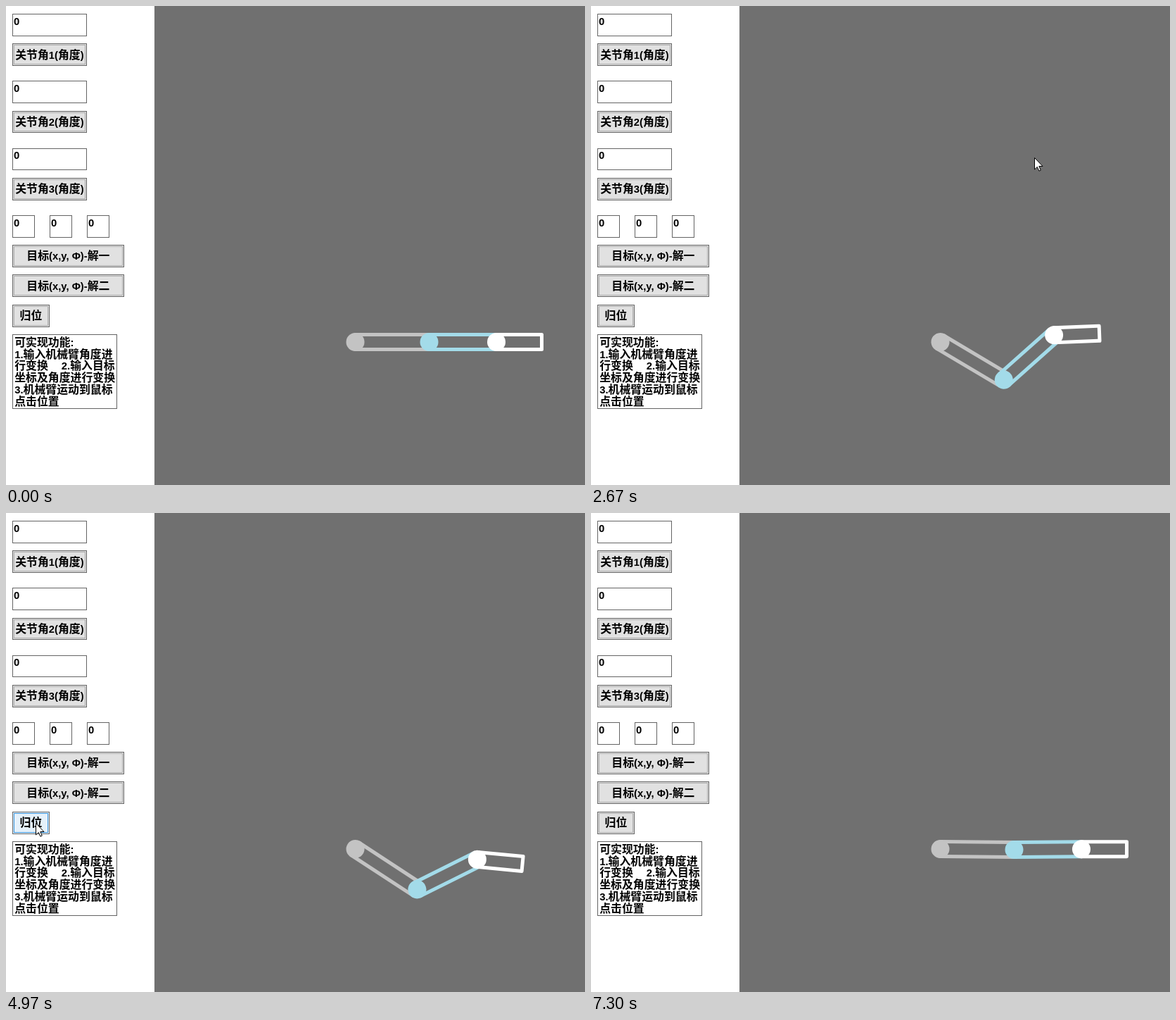
Animation of 823 by 680 pixels, one loop 7.53 s. Source, as an HTML page with a canvas:

```html
<!DOCTYPE html>
<html lang="zh">
<head>
<meta charset="utf-8">
<style>
html, body { margin: 0; width: 100%; height: 100%; overflow: hidden; background: #707070; }
canvas, svg { position: absolute; left: 0; top: 0; }
text { font: 13px "Noto Sans CJK SC", "Noto Sans CJK", sans-serif; fill: #111; }
#dialog { transform-origin: 638.5px 360.5px; }
#frame { filter: drop-shadow(0 2px 5px rgba(0, 0, 0, .4)); }
</style>
</head>
<body>
<canvas id="stage" width="823" height="680"></canvas>
<svg width="823" height="680">
  <g id="dialog">
    <rect id="frame" x="565.5" y="281.5" width="146" height="158" fill="#fbfbfb" stroke="#606060"/>
    <rect x="566" y="385" width="145" height="54" fill="#ebebeb"/>
    <rect id="ok" x="601" y="400" width="90" height="25" stroke="#0078d7" stroke-width="2"/>
    <text x="569" y="299">提示</text>
    <text x="578" y="352">无解!</text>
    <text x="646" y="417" text-anchor="middle" style="font-size:12px">确定</text>
    <path id="cross" d="M688 290l10 10m0-10l-10 10" stroke="#222"/>
  </g>
  <path id="pointer" d="M.5 .5V17L4.3 13.4L6.9 19.2L9.3 18.1L6.8 12.5H12Z" fill="#fff" stroke="#000"/>
</svg>
<script>
const $ = id => document.getElementById(id);
const ctx = $('stage').getContext('2d');
const LOOP = 7530;
const UNIT = 1.0583; // panel layout units to pixels

const links = [[105, '#c3c3c3'], [95.5, '#a3dbe9'], [64.5, '#ffffff']];

// Start time and goal angles (degrees) of each move
const moves = [
  [85, [20.5, -107, -35]],
  [1815, [33.2, -26.3, 5.5]],
  [5150, [0, 0, 0]]
];

// Pointer key points: time, x, y
const path = [
  [70, 650, 546], [250, 618, 384], [1130, 618, 384], [1740, 732, 498],
  [1900, 732, 498], [2670, 630, 215], [3200, 605, 155], [3700, 645, 414],
  [4370, 645, 414], [4970, 42, 440], [5450, 42, 440], [5750, 172, 461], [6550, 795, 681]
];

const mix = (a, b, k) => a + (b - a) * k;
const clamp = v => Math.max(0, Math.min(1, v));
const isHan = s => /[\u4e00-\u9fff]/.test(s);

// Rectangle in layout units, snapped to whole pixels
function box(x, y, w, h, fill, line, inset = 0) {
  const px = v => Math.ceil(v * UNIT - 1.6), py = v => Math.ceil(v * UNIT);
  const left = px(x) + inset, top = py(y) + inset;
  const width = px(x + w) - inset - left, height = py(y + h) - inset - top;
  ctx.fillStyle = fill;
  ctx.fillRect(left, top, width, height);
  ctx.strokeStyle = line;
  ctx.lineWidth = 1;
  ctx.strokeRect(left + .5, top + .5, width - 1, height - 1);
}

// Bold text in layout units, mixing Chinese and Latin runs
function label(str, x, y, centered) {
  const runs = str.match(/[\u4e00-\u9fff]+|[^\u4e00-\u9fff]+/g);
  const width = s => {
    ctx.font = isHan(s) ? 'bold 15px "Noto Sans CJK SC", "Noto Sans CJK", sans-serif'
      : 'bold 14px "Liberation Sans", sans-serif';
    return ctx.measureText(s).width;
  };
  if (centered) x -= runs.reduce((sum, s) => sum + width(s), 0) / 2;
  ctx.save();
  ctx.translate(-1.6, 0);
  ctx.scale(UNIT, UNIT);
  ctx.fillStyle = '#000';
  for (const s of runs) {
    const w = width(s);
    ctx.fillText(s, x, y);
    x += w;
  }
  ctx.restore();
}

function input(x, y, w) {
  box(x, y, w, 30, '#fff', '#646464');
  label('0', x + 2, y + 15.5);
}

function button(str, y, w, hot) {
  const face = hot ? '#e5f1fb' : '#e1e1e1';
  box(10, y, w, 30, face, '#646464');
  box(10, y, w, 30, face, hot ? '#3c96dc' : '#adadad', 2);
  label(str, 10 + w / 2, y + 20.5, true);
}

function panel(t) {
  box(0, 0, 200, 660, '#fff', '#fff');
  for (let i = 0; i < 3; i++) {
    input(10, 10 + 90 * i, 100);
    button(`关节角${i + 1}(角度)`, 50 + 90 * i, 100);
    input(10 + 50 * i, 280, 30);
  }
  button('目标(x,y, Φ)-解一', 320, 150);
  button('目标(x,y, Φ)-解二', 360, 150);
  button('归位', 400, 50, t > 4930 && t < 5900);
  box(10, 440, 140, 100, '#fff', '#646464');
  ['可实现功能:', '1.输入机械臂角度进', '行变换', '坐标及角度进行变换', '3.机械臂运动到鼠标', '点击位置']
    .forEach((s, i) => label(s, 13, 456 + 16 * i));
  label('2.输入目标', 76, 488);
}

function pose(t) {
  let angles = [0, 0, 0];
  for (const [start, goal] of moves) {
    const k = 1 - Math.exp(-1.93 * Math.max(0, t - start) / 1000);
    angles = angles.map((a, i) => mix(a, goal[i], k));
  }
  return angles;
}

function arm(t) {
  let x = 496.5, y = 477;
  pose(t).forEach((deg, i) => {
    const [len, color] = links[i], a = deg * Math.PI / 180;
    ctx.save();
    ctx.translate(x, y);
    ctx.rotate(a);
    ctx.strokeStyle = ctx.fillStyle = color;
    ctx.lineWidth = 5;
    ctx.lineJoin = 'round';
    ctx.strokeRect(0, -10.5, len, 21);
    ctx.beginPath();
    ctx.arc(0, 0, 13, 0, 7);
    ctx.fill();
    ctx.restore();
    x += len * Math.cos(a);
    y += len * Math.sin(a);
  });
}

function dialog(t) {
  const closing = t > 4200;
  const show = closing ? clamp((4386 - t) / 200) : clamp((t - 2930) / 180);
  const size = closing ? mix(.94, 1, show) : mix(.9, 1, show);
  $('dialog').style.opacity = show;
  $('dialog').style.transform = `scale(${size})`;
  $('ok').setAttribute('fill', closing ? '#cce4f7' : t > 3640 ? '#e5f1fb' : '#dfdfdf');
  $('cross').style.opacity = closing ? 0 : 1;
}

function pointer(t) {
  const i = path.findIndex(p => p[0] > t);
  $('pointer').style.opacity = i > 0 ? 1 : 0;
  if (i < 1) return;
  const [t0, x0, y0] = path[i - 1], [t1, x1, y1] = path[i];
  const k = (t - t0) / (t1 - t0);
  const x = Math.round(mix(x0, x1, k)), y = Math.round(mix(y0, y1, k));
  $('pointer').setAttribute('transform', `translate(${x} ${y})`);
}

const start = performance.now();
function loop() {
  const t = (performance.now() - start) % LOOP;
  ctx.clearRect(0, 0, 823, 680);
  panel(t);
  arm(t);
  dialog(t);
  pointer(t);
  requestAnimationFrame(loop);
}
loop();
</script>
</body>
</html>
```
